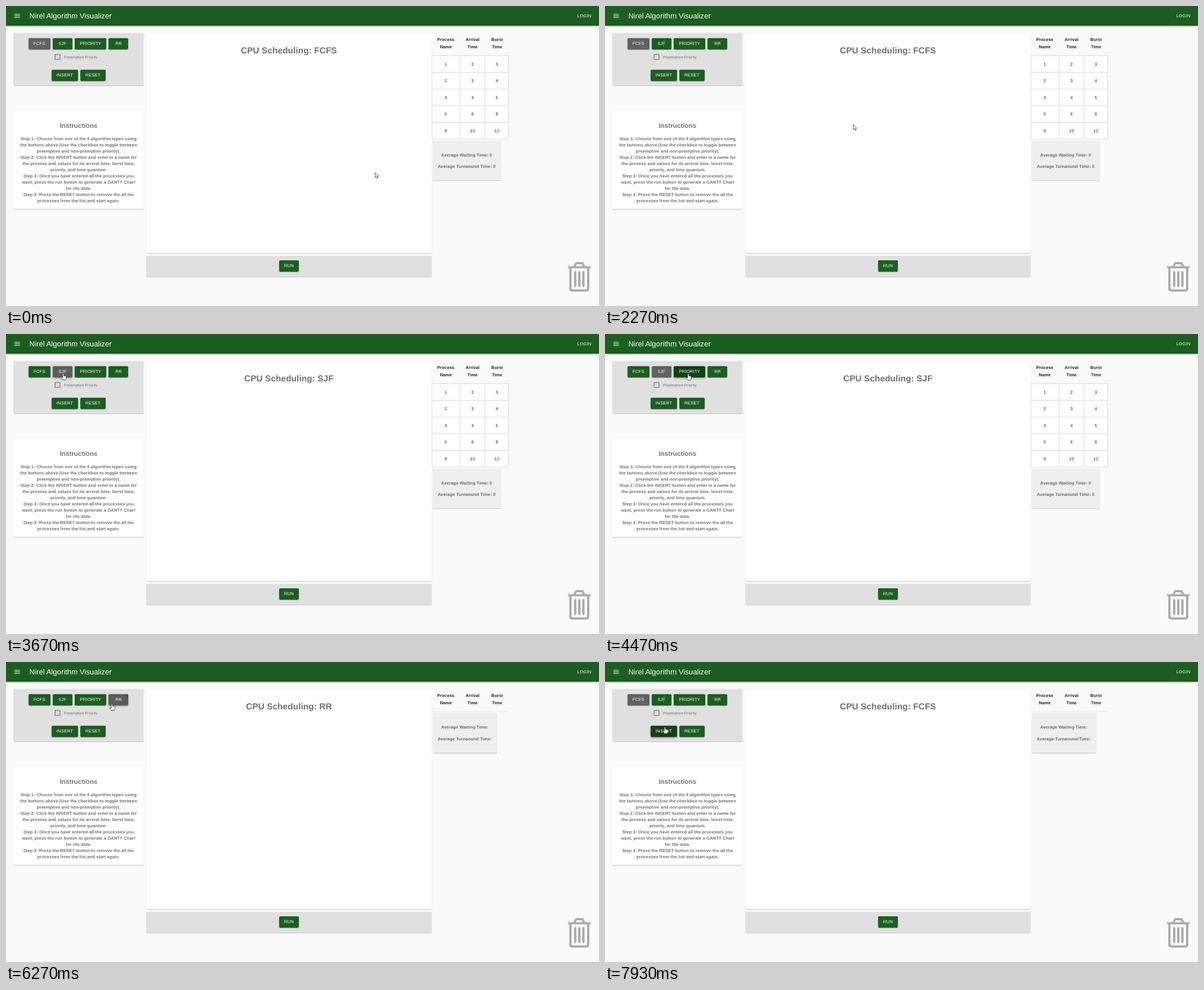
Recreate the animation shown at these times as an HTML page. Size 1053x532 px, loop 8 s.

```html
<!DOCTYPE html>
<html lang="en">
<head>
<meta charset="utf-8">
<title>CPU Scheduling</title>
<style>
html, body { margin: 0; width: 100%; height: 100%; overflow: hidden; background: #fafafa; }
body { position: relative; font: 7.68px/1 "Liberation Sans", Arial, sans-serif; text-rendering: geometricPrecision; }
svg { position: absolute; left: 0; top: 0; overflow: visible; }
.bar, .card, .btn { position: absolute; box-sizing: border-box; }
.bar { left: 0; top: 0; width: 100%; height: 35.1px; background: #1b5e20;
  box-shadow: 0 1.1px 2.2px -.55px rgba(0,0,0,.2), 0 2.2px 2.75px rgba(0,0,0,.14), 0 .55px 5.5px rgba(0,0,0,.12); }
.card { border-radius: 2.2px; background: #fff;
  box-shadow: 0 1.1px .55px -.55px rgba(0,0,0,.2), 0 .55px .55px rgba(0,0,0,.14), 0 .55px 1.65px rgba(0,0,0,.12); }
.grey { background: #e0e0e0; }
.btn { height: 20px; line-height: 20px; border-radius: 2.2px; overflow: hidden; background: #1b5e20; color: #fff;
  text-align: center; letter-spacing: .22px; white-space: nowrap;
  box-shadow: 0 1.65px .55px -1.1px rgba(0,0,0,.2), 0 1.1px 1.1px rgba(0,0,0,.14), 0 .55px 2.75px rgba(0,0,0,.12); }
.btn.hover { box-shadow: 0 1.1px 2.2px -.55px rgba(0,0,0,.2), 0 2.2px 2.75px rgba(0,0,0,.14), 0 .55px 5.5px rgba(0,0,0,.12); }
.btn i { position: absolute; border-radius: 50%; background: #fff; opacity: 0; }
#avg { background: #eee; }
text { letter-spacing: .082px; text-anchor: middle; fill: rgba(0,0,0,.87); }
.soft { fill: rgba(0,0,0,.56); font-weight: bold; }
.head { font-weight: bold; }
.light { fill: #fff; text-anchor: start; }
</style>
</head>
<body>
<div class="bar"></div>
<div class="card grey" style="left:13.2px;top:48.3px;width:231.3px;height:92.9px"></div>
<div class="card" style="left:13.2px;top:185.5px;width:231.3px;height:174px"></div>
<div class="card" style="left:249px;top:48.3px;width:506.8px;height:389.7px"></div>
<div class="card grey" style="left:249px;top:442.6px;width:506.8px;height:37.2px"></div>
<div class="card" id="avg"></div>
<svg id="page" width="1053" height="532">
  <path d="M14.8 14.8h9.9M14.8 17.55h9.9M14.8 20.3h9.9" stroke="#fff" stroke-width="1.1"/>
  <text class="light" x="41.6" y="22.1" font-size="13.16" style="letter-spacing:0">Nirel Algorithm Visualizer</text>
  <text class="light" x="1014.6" y="20.2" style="letter-spacing:.22px">LOGIN</text>
  <rect x="87.1" y="86" width="8.8" height="8.8" rx=".6" fill="none" stroke="rgba(0,0,0,.6)" stroke-width="1.1"/>
  <text x="103" y="93.3" font-size="6.58" style="letter-spacing:.22px;text-anchor:start;fill:rgba(0,0,0,.56)">Preemptive Priority</text>
  <text class="soft" x="128.9" y="215.6" font-size="11.52">Instructions</text>
  <text class="soft" id="title" x="502.4" y="83.6" font-size="15.36"></text>
  <g fill="none" stroke="#a9a9a9" stroke-linecap="round" stroke-linejoin="round">
    <path d="M999.5 463.3H1036.5M1009.5 461.8L1011.8 457Q1012.3 456 1013.5 456H1022.5Q1023.7 456 1024.2 457L1026.5 461.8" stroke-width="3.8"/>
    <path d="M1002.2 465V501Q1002.2 504.5 1005.7 504.5H1030.3Q1033.8 504.5 1033.8 501V465" stroke-width="3.9"/>
    <path d="M1010.7 472V496.5M1018 472V496.5M1025.3 472V496.5" stroke-width="4"/>
  </g>
</svg>
<svg id="pointer" width="1" height="1" style="z-index:2">
  <path id="arrow" d="M.4.5V9.4L2.4 7.6 3.8 10.7 5.3 10 4 7H6.6Z" fill="#fff" stroke="#222" stroke-width=".75"/>
  <path id="hand" d="M-1.1 1Q0-.6 1.1 1V4.2Q2 3.6 2.8 4.6 3.6 4 4.2 5 5.4 4.6 5.4 6V8.5L4.2 11.7H-1L-3.6 7.6Q-3.4 6.2-2.2 6.8L-1.1 8Z" fill="#fff" stroke="#222" stroke-width=".8"/>
</svg>
<script>
const LOOP = 8000;
const $ = id => document.getElementById(id);
const page = $('page');

function svg(parent, tag, attrs, text = '') {
  const el = document.createElementNS('http://www.w3.org/2000/svg', tag);
  for (const k in attrs) el.setAttribute(k, attrs[k]);
  el.textContent = text;
  parent.append(el);
  return el;
}
const label = (parent, x, y, text, cls = '') => svg(parent, 'text', { x, y, class: cls }, text);

[
  'Step 1: Choose from one of the 6 algorithm types using',
  'the buttons above (Use the checkbox to toggle between',
  'preemptive and non-premptive priority).',
  'Step 2: Click the INSERT button and enter in a name for',
  'the prcoess and values for its arrival time, burst time,',
  'priority, and time quantum.',
  'Step 3: Once you have entered all the processes you',
  'want, press the run button to generate a GANTT Chart',
  'for the data.',
  'Step 4: Press the RESET button to remove the all the',
  'processes from the list and start again.'
].forEach((line, i) => label(page, 128.9, 238.3 + i * 10.98, line, 'soft'));

// Result tables
function header(cols, right) {
  const g = svg(page, 'g', {});
  svg(g, 'path', { d: `M756.5 88H${right}`, stroke: '#e0e0e0', 'stroke-width': .8 });
  for (const [x, top, bottom] of cols) {
    label(g, x, bottom ? 62 : 68.6, top, 'head');
    if (bottom) label(g, x, 75.2, bottom, 'head');
  }
  return g;
}
const columns = (a, b, c) => [[a, 'Process', 'Name'], [b, 'Arrival', 'Time'], [c, 'Burst', 'Time']];
const plain = header(columns(781, 828.4, 872), 893);
const ranked = header([...columns(780, 825.3, 866), [908, 'Priority']], 931);

const rows = svg(page, 'g', {});
svg(rows, 'rect', { x: 756.5, y: 88, width: 136.5, height: 148, fill: '#fff' });
let grid = '';
for (let i = 0; i < 6; i++) grid += `M756.5 ${88 + i * 29.6}H893`;
for (const x of [756.5, 806.2, 850.7, 892.7]) grid += `M${x} 88V236`;
svg(rows, 'path', { d: grid, stroke: '#dcdcdc', 'stroke-width': 1.1 });
[[1, 2, 3], [2, 3, 4], [3, 4, 5], [5, 6, 8], [9, 10, 12]].forEach((r, i) =>
  r.forEach((v, j) => label(rows, [781, 828.4, 871.7][j], 105.5 + i * 29.6, v)));

// Averages: text sits on the card below the table
const waiting = label(page, 0, 0, '', 'soft');
const turn = label(page, 0, 0, '', 'soft');
function showAverages(filled) {
  const y = filled ? 238.9 : 90.6, w = filled ? 121 : 114, end = filled ? ' 0' : '';
  Object.assign($('avg').style, { left: '757.5px', top: y + 'px', width: w + 'px', height: '70.2px' });
  [[waiting, 'Average Waiting Time:', 27.7], [turn, 'Average Turnaound Time:', 48.5]].forEach(([el, text, dy]) => {
    el.setAttribute('x', 757.5 + w / 2);
    el.setAttribute('y', y + dy);
    el.textContent = text + end;
  });
}

// Buttons: colour changes are [time, colour]
const GREEN = [27, 94, 32], DARK = [18, 65, 22], GREY = [97, 97, 97], DIM = [62, 62, 62];
const buttons = [
  ['FCFS', 40.05, 57, 38.5, [[0, GREY], [3400, GREEN], [6650, DARK], [6840, DIM], [7500, GREY]]],
  ['SJF', 82.9, 57, 35.1, [[0, GREEN], [2850, DARK], [3400, DIM], [3900, GREY], [4700, GREEN]]],
  ['PRIORITY', 122.4, 57, 55.6, [[0, GREEN], [4000, DARK], [4700, DIM], [5080, GREY], [5900, GREEN]]],
  ['RR', 182.35, 57, 35.1, [[0, GREEN], [5090, DARK], [5900, DIM], [6300, GREY], [6840, GREEN]]],
  ['INSERT', 80.95, 113, 47, [[0, GREEN], [7670, DARK]]],
  ['RESET', 132.3, 113, 44.3, [[0, GREEN]]],
  ['RUN', 484.8, 451, 35.1, [[0, GREEN]]]
].map(([text, x, y, w, steps]) => {
  const el = document.createElement('div');
  el.className = 'btn';
  el.textContent = text;
  Object.assign(el.style, { left: x + 'px', top: y + 'px', width: w + 'px' });
  const ripple = document.createElement('i');
  el.append(ripple);
  document.body.append(el);
  return { el, ripple, x, y, w, steps };
});

// Clicks: time, heading, button index
const clicks = [[0, 'FCFS', -1], [3400, 'SJF', 1], [4700, 'Priority', 2], [5900, 'RR', 3], [6840, 'FCFS', 0]];

const path = [
  [0, 655, 295], [69, 655, 295], [70, 655, 305], [230, 655, 305], [600, 594, 269.4], [1069, 594, 269.4],
  [1070, 593, 269], [1960, 593, 269], [2800, 101, 78], [2940, 101.5, 69.8], [3700, 101.5, 69.8],
  [4250, 148, 70.2], [4800, 148, 70.2], [5200, 183, 74], [5420, 183, 74], [5470, 186.7, 74.2],
  [5600, 194, 74.4], [6200, 194, 74.4], [6750, 63, 69.2], [7340, 63, 69.2], [7920, 106.5, 115.3], [8000, 106.5, 115.3]
];
const smooth = p => p * p * (3 - 2 * p);
const mix = (a, b, p) => a + (b - a) * p;

function pointerAt(t) {
  const i = path.findIndex(p => p[0] > t);
  const [t0, x0, y0] = path[i - 1], [t1, x1, y1] = path[i];
  const p = smooth((t - t0) / (t1 - t0));
  return [mix(x0, x1, p), mix(y0, y1, p)];
}

function colourAt(steps, t) {
  const i = steps.findLastIndex(s => s[0] <= t);
  const to = steps[i][1];
  if (!i) return to;
  const p = smooth(Math.min(1, (t - steps[i][0]) / 250));
  return to.map((c, k) => mix(steps[i - 1][1][k], c, p));
}

let shown = -1;
function showState(n) {
  if (n === shown) return;
  shown = n;
  $('title').textContent = 'CPU Scheduling: ' + clicks[n][1];
  const filled = n < 2;
  rows.style.display = filled ? '' : 'none';
  plain.style.display = n === 2 ? 'none' : '';
  ranked.style.display = n === 2 ? '' : 'none';
  showAverages(filled);
}

function draw(t) {
  const [x, y] = pointerAt(t);
  const n = clicks.findLastIndex(c => c[0] <= t);
  showState(n);
  let over = false;
  buttons.forEach((b, i) => {
    const inside = x >= b.x && x <= b.x + b.w && y >= b.y && y <= b.y + 20;
    over = over || inside;
    b.el.classList.toggle('hover', inside);
    b.el.style.backgroundColor = `rgb(${colourAt(b.steps, t).map(Math.round)})`;
    const age = t - clicks[n][0];
    const live = clicks[n][2] === i && age < 650;
    b.ripple.style.opacity = live ? .16 * Math.min(1, (650 - age) / 300) : 0;
    if (live) {
      const [cx, cy] = pointerAt(clicks[n][0]);
      const r = Math.max(27, b.w * .72) * (1 - (1 - Math.min(1, age / 550)) ** 2.4);
      Object.assign(b.ripple.style, { left: cx - b.x - r + 'px', top: cy - b.y - r + 'px', width: 2 * r + 'px', height: 2 * r + 'px' });
    }
  });
  $('pointer').style.transform = `translate(${x}px, ${y}px)`;
  $('arrow').style.display = over ? 'none' : '';
  $('hand').style.display = over ? '' : 'none';
}

const start = performance.now();
function tick() {
  draw((performance.now() - start) % LOOP);
  requestAnimationFrame(tick);
}
tick();
</script>
</body>
</html>
```
